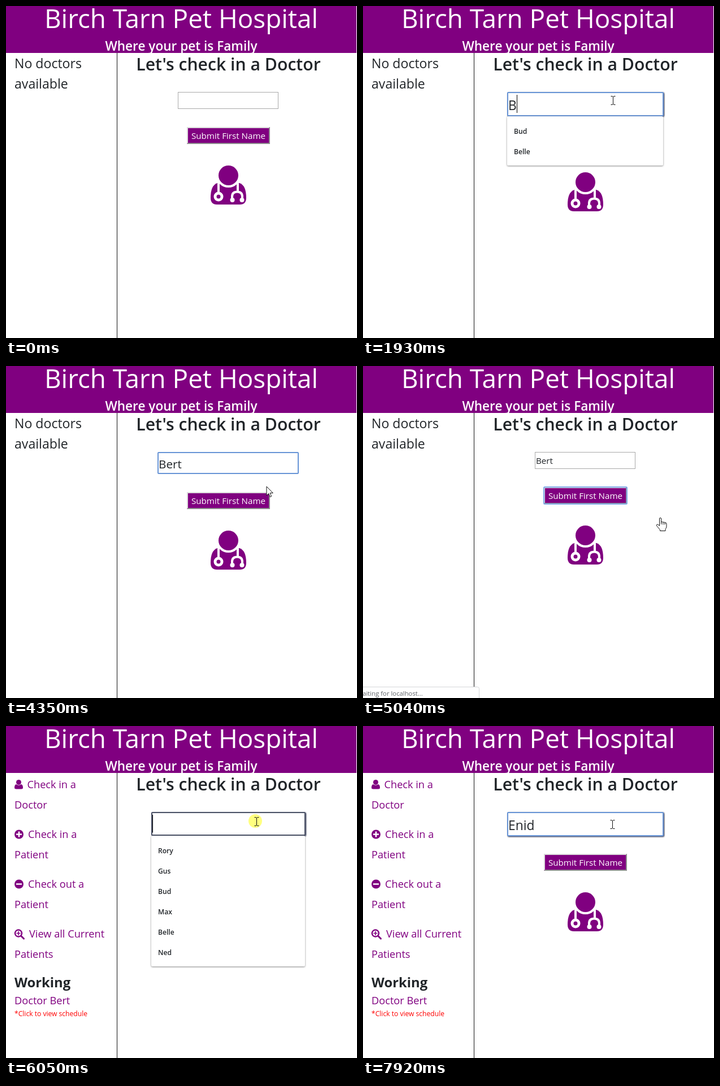
Recreate the animation shown at these times as an HTML page. Size 621x587 px, loop 7990 ms.

```html
<!DOCTYPE html>
<html lang="en">
<head>
<meta charset="utf-8">
<title>Pet hospital check-in</title>
<style>
  html, body { margin: 0; width: 100%; height: 100%; overflow: hidden; background: #fff; }
  svg { display: block; width: 100vw; height: 100vh; }
  text { font-family: "Open Sans", "Noto Sans", sans-serif; fill: #212529; white-space: pre; }
  .mid { text-anchor: middle; }
  .white { fill: #fff; }
  .purple, .links text { fill: purple; }
  .links text { font-size: 18.2px; }
  #popup rect { fill: #fff; filter: drop-shadow(0 1px 1.5px #0007); }
  #popup text { font-size: 12.1px; font-weight: 600; }
  #field { fill: #fff; }
  #field.hover { filter: drop-shadow(1px 1px 1px #1c2340); }
  .scope { fill: none; stroke: #fff; stroke-width: 4; stroke-linecap: round; }
  .sign { stroke: #fff; stroke-width: 2.6; }
  .pointer { fill: #fff; stroke: #111; stroke-linejoin: round; }
</style>
</head>
<body>
<svg viewBox="0 0 621 587" preserveAspectRatio="none">
  <rect width="621" height="587" fill="#fff"/>
  <rect width="620" height="83" fill="purple"/>
  <text class="mid white" x="310" y="39" font-size="45.8">Birch Tarn Pet Hospital</text>
  <text class="mid white" x="310" y="79" font-size="22.6" font-weight="600">Where your pet is Family</text>
  <rect x="196" y="83" width="1" height="504" fill="#111"/>
  <text class="mid" x="393.5" y="114" font-size="30.2" font-weight="600">Let's check in a Doctor</text>

  <g id="emptyList" font-size="23.1">
    <text x="15" y="110">No doctors</text>
    <text x="15" y="146">available</text>
  </g>

  <g id="menu">
    <g class="links">
      <text x="37.5" y="110">Check in a</text><text x="15" y="146">Doctor</text>
      <text x="39" y="198">Check in a</text><text x="15" y="234">Patient</text>
      <text x="39" y="286">Check out a</text><text x="15" y="322">Patient</text>
      <text x="41" y="374">View all Current</text><text x="15" y="410">Patients</text>
      <text x="15" y="492">Doctor Bert</text>
    </g>
    <g class="purple">
      <circle cx="22.5" cy="99.5" r="4.5"/>
      <path d="M18 103Q22.5 106.500 27 103Q30 104 30 109Q30 111.500 27 111.500H18Q15 111.500 15 109Q15 104 18 103Z"/>
      <circle cx="23" cy="191.500" r="8"/>
      <circle cx="23" cy="279.500" r="8"/>
    </g>
    <path class="sign" d="M18 191.500h10M23 186.500v10M18 279.500h10"/>
    <g fill="none" stroke="purple">
      <circle cx="22" cy="366.500" r="6" stroke-width="2.4"/>
      <path d="M27 371.500l4.500 4.500" stroke-width="3" stroke-linecap="round"/>
      <path d="M18.500 366.500h7M22 363v7" stroke-width="1.6"/>
    </g>
    <text x="15" y="462" font-size="23.8" font-weight="700">Working</text>
    <text x="15" y="513" font-size="12.1" style="fill:red">*Click to view schedule</text>
  </g>

  <g id="below">
    <rect x="320" y="214" width="147" height="30" fill="purple"/>
    <path d="M320 244V214H467L465 216H322V242Z" fill="#dcdcdc"/>
    <path d="M467 214V244H320L322 242H465V216Z" fill="#8e8e8e"/>
    <rect id="buttonRing" x="320" y="214" width="147" height="30" rx="1.5" fill="none" stroke="#7fa9e6" stroke-width="2"/>
    <text class="mid white" x="393.5" y="235" font-size="15.2">Submit First Name</text>
    <path class="purple" d="M374 313Q362 317 362 339Q362 351 373 351H414Q425 351 425 339Q425 317 413 313Z"/>
    <circle class="purple" cx="393.5" cy="299.500" r="17.500" stroke="#fff" stroke-width="8" paint-order="stroke"/>
    <path class="scope" d="M376 314V330M410 314V327M400 343V337Q400 328.500 409 328.500Q418 328.500 418 337V343"/>
    <circle cx="376" cy="337" r="8.500" fill="#fff"/>
    <circle class="purple" cx="376" cy="337" r="3.500"/>
    <circle cx="400.500" cy="343" r="4" fill="#fff"/>
    <circle cx="417.500" cy="343" r="4" fill="#fff"/>
  </g>

  <rect id="field"/>
  <text id="value"></text>
  <rect id="caret" width="1" fill="#000"/>
  <g id="popup"></g>

  <g id="status">
    <rect x="-5" y="567.5" width="210.500" height="25" rx="3" fill="#fff" stroke="#d5d7da"/>
    <text x="-11" y="583" font-size="11.3" style="fill:#5f6368">Waiting for localhost...</text>
  </g>

  <g id="cursor">
    <circle id="click" cx="-2" cy="-1" r="12" fill="#ffff00" opacity=".5"/>
    <path id="beam" d="M-3.500 -7.500H-1L.5 -6.500L2 -7.500H4.500M.5 -6.500V6.500M-3.500 7.500H-1L.5 6.500L2 7.500H4.500" fill="none" stroke="#111"/>
    <path id="arrow" class="pointer" d="M0 0V16L3.700 12.500L6.200 18.500L8.700 17.400L6.200 11.600H11.300Z"/>
    <path id="hand" class="pointer" d="M-1.500 12V2Q-1.500 .5 0 .5Q1.700 .5 1.700 2V8Q3.300 6.500 4.900 8.300Q6.700 7.200 8 9Q10.800 8.300 11 11V16Q10.500 19 9 20.500V23.500H-.5V21.500L-6.500 14.500Q-7 11.800 -4.500 12L-1.500 14.500ZM1.700 8V12M4.900 8.300V12.500M8 9V12.500"/>
  </g>
</svg>
<script>
const LOOP = 7990, CARET_HALF = 545;
const NAMES = ["Rory", "Gus", "Bud", "Max", "Belle", "Ned"];

// Each entry also restarts the caret blink.
const TYPING = [
  [0, ""], [860, ""], [1930, "B"], [2550, "B"], [2870, "Be"], [2940, "B"], [3190, "Be"],
  [3420, "Ber"], [3480, "Bert"], [5120, ""], [6050, ""],
  [6910, "E"], [6970, "En"], [7140, "Eni"], [7310, "Enid"]
];
const GROWTH = [
  [340, 0], [500, .35], [840, .79], [930, .98], [1160, 1],
  [4170, 1], [4350, .73], [4570, .32], [4770, .11], [4970, 0],
  [5500, 0], [5650, .35], [5900, .85], [6050, .96], [6200, 1]
];
const POINTER = [
  [70, 450, 446], [340, 446, 180], [840, 442, 167], [4170, 442, 167],
  [4350, 461, 213], [4500, 455, 232], [4860, 455, 232], [5040, 526, 268],
  [5120, 533, 276], [5440, 533, 276], [5560, 470, 180], [5900, 443, 169],
  [7860, 443, 169], [7920, 441, 174]
];
const CLICKS = [[840, 920], [4690, 4850], [5980, 6130]];

const $ = id => document.getElementById(id);
const set = (el, attrs) => { for (const k in attrs) el.setAttribute(k, attrs[k]); };
const show = (id, on) => { $(id).style.display = on ? "" : "none"; };
const within = (t, from, to) => t >= from && t < to;

// Linear interpolation through rows of [time, ...values].
function track(rows, t) {
  const next = rows.findIndex(row => row[0] > t);
  if (next < 0) return rows[rows.length - 1].slice(1);
  if (next === 0) return rows[0].slice(1);
  const a = rows[next - 1], b = rows[next], p = (t - a[0]) / (b[0] - a[0]);
  return a.slice(1).map((v, i) => v + (b[i + 1] - v) * p);
}

function drawField(t, grow, focused) {
  const left = Math.round(304 - 49 * grow), right = Math.round(482 + 50 * grow);
  const bottom = Math.floor(182 + 13 * grow);
  const hover = within(t, 340, 4170) || t >= 5500;
  const settling = within(t, 340, 1160) || within(t, 5500, 6280);
  const line = focused || hover ? 2 : 1;
  const field = $("field"), value = $("value");
  set(field, {
    x: left + line / 2, y: 152 + line / 2, rx: line - 1,
    width: right - left - line, height: bottom - 152 - line,
    "stroke-width": line,
    stroke: settling ? "#4a5166" : focused ? "#6794d6" : "#a9a9a9"
  });
  field.classList.toggle("hover", hover);

  const [since, text] = TYPING.filter(row => row[0] <= t).pop();
  const textLeft = left + 2;
  value.textContent = text;
  set(value, { x: textLeft, y: 173 + 10.5 * grow, "font-size": 15.2 + 7.6 * grow });
  const caretX = Math.round(textLeft + (text ? value.getComputedTextLength() : 0));
  set($("caret"), { x: caretX, y: 156 + grow, height: 22 + 10 * grow });
  show("caret", focused && Math.floor((t - since) / CARET_HALF) % 2 === 0);
  drawPopup(left, right, bottom, focused ? NAMES.filter(name => name.startsWith(text)) : []);
  return bottom;
}

let popupKey;
function drawPopup(left, right, top, names) {
  const key = [left, right, top, names].join();
  if (key === popupKey) return;
  popupKey = key;
  $("popup").innerHTML = !names.length ? "" :
    `<rect x="${left}" y="${top}" width="${right - left - 1}" height="${names.length * 36 + 15}" rx="2"/>` +
    names.map((name, i) => `<text x="${left + 12}" y="${top + 31 + i * 36}">${name}</text>`).join("");
}

function drawCursor(t, fieldBottom, shift) {
  const [x, y] = track(POINTER, t).map(Math.round);
  const onButton = within(x, 320, 467) && within(y, 214 + shift, 244 + shift);
  const beam = y < fieldBottom && x < 532;
  const hand = !beam && (onButton || within(t, 4400, 5120));
  set($("cursor"), { transform: `translate(${x} ${y})` });
  show("cursor", t >= 70);
  show("beam", beam);
  show("hand", hand);
  show("arrow", !beam && !hand);
  show("click", CLICKS.some(([from, to]) => within(t, from, to)));
}

function draw() {
  const t = performance.now() % LOOP;
  const [grow] = track(GROWTH, t);
  const shift = Math.round(12 * grow);
  const focused = within(t, 930, 4700) || t >= 5980;
  set($("below"), { transform: `translate(0 ${shift})` });
  show("emptyList", t < 5120);
  show("menu", t >= 5120);
  show("buttonRing", within(t, 4700, 5120));
  show("status", within(t, 5040, 5440));
  drawCursor(t, drawField(t, grow, focused), shift);
  requestAnimationFrame(draw);
}
draw();
</script>
</body>
</html>
```
